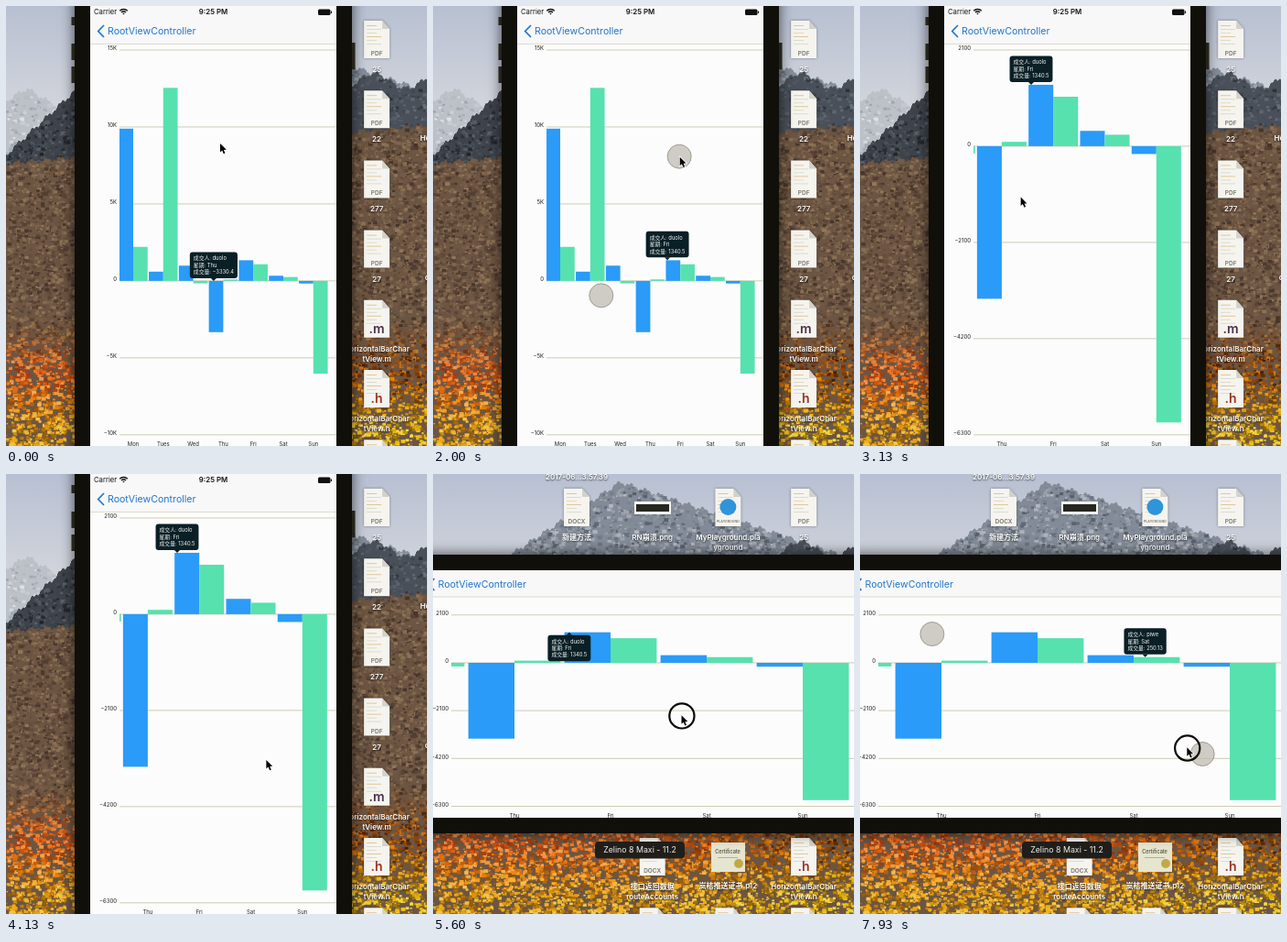
An HTML page with a canvas for the animation above (8 s loop, 460 by 480 pixels).

```html
<!DOCTYPE html>
<html>
<head>
<meta charset="utf-8">
<style>
html, body { margin: 0; width: 100%; height: 100%; overflow: hidden; background: #000; }
canvas { display: block; }
</style>
</head>
<body>
<canvas id="stage" width="460" height="480"></canvas>
<script>
const LOOP = 8000, W = 460, H = 480;
const FONT = 'Inter, "Noto Sans CJK SC", "Noto Sans CJK", sans-serif';
const BLUE = '#2a9bf8', GREEN = '#56e1af', TINT = '#2276cc', GRID = '#cdcdb4', INK = '#22221e';
const BUBBLE = '#0a1f26', BEZEL = '#100f09', PAPER = '#fcfcfd';
const CENTER = { x: 226.5, y: 240 };
const stage = document.getElementById('stage').getContext('2d');
let g = stage;

const DAYS = [
  ['Mon', 9890, 2210], ['Tues', 600, 12540], ['Wed', 990, -160], ['Thu', -3330.4, 95],
  ['Fri', 1340.5, 1080], ['Sat', 335, 250.13], ['Sun', -170, -6030]
];
// shift: touched point, in day widths from the middle of the day
const MARKERS = {
  thu: { day: 3, series: 1, shift: -.32, name: 'duolo' },
  fri: { day: 4, series: 1, shift: -.43, name: 'duolo' },
  sat: { day: 5, series: 2, shift: .12, name: 'piwe' }
};

const lerp = (a, b, p) => a + (b - a) * p;
const within = (t, ...spans) => spans.some(([a, b]) => t >= a && t < b);
function ease(from, to, t) {
  const p = Math.min(1, Math.max(0, (t - from) / (to - from)));
  return p * p * (3 - 2 * p);
}

function rect(color, x, y, w, h) {
  g.fillStyle = color;
  g.fillRect(x, y, w, h);
}
function roundRect(color, x, y, w, h, r) {
  g.fillStyle = color;
  g.beginPath();
  g.roundRect(x, y, w, h, r);
  g.fill();
}
function fillPath(color, d, x = 0, y = 0) {
  g.save();
  g.translate(x, y);
  g.fillStyle = color;
  g.fill(new Path2D(d));
  g.restore();
}
function circle(x, y, r, fill, stroke, width) {
  g.beginPath();
  g.arc(x, y, r, 0, 7);
  if (fill) { g.fillStyle = fill; g.fill(); }
  if (stroke) { g.strokeStyle = stroke; g.lineWidth = width; g.stroke(); }
}
function text(s, x, y, size, color, align = 'left', weight = 400) {
  g.font = `${weight} ${size}px ${FONT}`;
  g.fillStyle = color;
  g.textAlign = align;
  g.textBaseline = 'middle';
  g.fillText(s, x, y);
}
function clipped(x, y, w, h, paint) {
  g.save();
  g.beginPath();
  g.rect(x, y, w, h);
  g.clip();
  paint();
  g.restore();
}
function shadowed(color, blur, dy, paint) {
  g.save();
  g.shadowColor = color;
  g.shadowBlur = blur;
  g.shadowOffsetY = dy;
  paint();
  g.restore();
}

// ---- Desktop ----
let seed = 7;
function rnd() {
  seed = (seed * 16807) % 2147483647;
  return seed / 2147483647;
}
// Scatters small dabs below a skyline; colorAt gives the colour of each
function slope(count, x0, x1, bottom, skyline, colorAt) {
  const edge = x => skyline(x) + 2 * Math.sin(x * .4) + Math.sin(x * 1.3);
  for (let x = x0; x < x1; x++) rect(colorAt(x, edge(x), .5), x, edge(x), 1.5, bottom - edge(x));
  for (let i = 0; i < count; i++) {
    const x = lerp(x0, x1, rnd()), top = edge(x) + 1, y = lerp(top, bottom, rnd());
    const size = 1 + rnd() * 3;
    rect(colorAt(x, y, rnd()), x, y, size * 1.3, size);
  }
}
const rock = (light, contrast) => (x, y, r) => `hsl(215 9% ${light + (r - .5) * contrast}%)`;
function foliage(x, y, r) {
  const autumn = ease(330, 410, y), right = ease(190, 460, x), golden = ease(390, 470, y);
  const hue = lerp(27, 21, autumn) + 20 * golden + (r - .5) * 10 + 6 * right * autumn;
  const shade = 18 * right * (1 - ease(395, 470, y)) * autumn;
  const light = lerp(34, 48, autumn) - shade + (r - .5) * lerp(24, 34, autumn);
  return `hsl(${hue} ${lerp(24, 88, autumn)}% ${light}%)`;
}
function wallpaper() {
  const sky = g.createLinearGradient(0, 0, 0, 150);
  sky.addColorStop(0, '#b7c0d2');
  sky.addColorStop(1, '#dcdcdf');
  rect(sky, 0, 0, W, H);
  slope(300, 0, 75, 180, x => 90 + Math.abs(x - 22) * .6, rock(76, 24));
  slope(3500, 84, W, 160, x => 9 + (x < 204 ? (204 - x) * .66 : (x - 204) * .33), rock(55, 36));
  slope(300, 378, W, 170, x => 82 + 8 * Math.sin(x * .09), rock(32, 24));
  slope(500, 0, 75, 210, x => 162 - x * .93, rock(27, 26));
  slope(15000, 0, W, H, x => 172 - x * .09, foliage);
}
const column = i => 157 + 82.7 * i, row = i => 16 + 76.2 * i;
function page(x, y) {
  shadowed('#0006', 3, 0, () => fillPath('#f5f4ef', 'M-14 0H6L14 9V41H-14Z', x, y));
  fillPath('#d2d1ca', 'M6 0V9H14Z', x, y);
  for (let i = 0; i < 6; i++) rect(i % 3 ? '#dddccb' : '#e2c798', x - 11, y + 5 + i * 4, 11 + (i * 5) % 10, 1);
}
function label(x, y, ...lines) {
  shadowed('#000b', 2, 1, () =>
    lines.forEach((s, i) => text(s, x, y + i * 11, 8, '#fff', 'center', 600)));
}
function file(col, line, kind, size, color, ...names) {
  const x = column(col), y = row(line);
  page(x, y);
  text(kind, x, y + (size > 9 ? 32 : 36), size, color, 'center', 600);
  label(x, y + 53.5, ...names);
}
function desktop() {
  wallpaper();
  const gray = '#77756c';
  label(column(0), 4, '2017-06...3.57.39');
  file(0, 0, 'DOCX', 6.5, gray, '新建方法');
  rect('#f4f4ee', 220, 30, 40, 14);
  rect('#28271f', 222, 33, 36, 8);
  label(column(1), 70, 'RN崩溃.png');
  file(2, 0, 'PLAYGROUND', 3.6, gray, 'MyPlayground.pla', 'yground');
  circle(column(2), 36, 9, '#2f94d8');
  ['25', '22', '277', '27'].forEach((name, i) => file(3, i, 'PDF', 6.5, gray, name));
  file(3, 4, '.m', 14, '#4b3048', 'HorizontalBarChar', 'tView.m');
  file(3, 5, '.h', 14, '#9c3320', 'HorizontalBarChar', 'tView.h');
  file(1, 5, 'DOCX', 6.5, gray, '接口返回数据', 'routeAccounts');
  rect('#e6e5cf', 304, 402, 37, 32);
  text('Certificate', 322, 412, 5.5, '#4c4a38', 'center', 500);
  rect('#b5b08c', 311, 418, 22, 1);
  circle(334, 425, 5, '#c2a948');
  label(column(2), 450, '岚桔推送证书.p12');
  for (let i = 1; i < 4; i++) page(column(i), row(6));
  label(458, 145, 'Ho');
  label(460, 297, 'c');
}
const backdrop = document.createElement('canvas');
backdrop.width = W;
backdrop.height = H;
g = backdrop.getContext('2d');
desktop();
g = stage;

// ---- Chart ----
const signed = v => String(v).replace('-', '−');
const tickLabel = v => v && v % 5000 === 0 ? signed(v / 1000) + 'K' : signed(v);

// The value axis fits the bars that are in view
function valueRange({ left, right, pitch, monday }) {
  if (monday + pitch * 1.48 <= left) return { max: 2100, min: -6300, step: 2100 };
  const sundayShown = monday + pitch * 5.52 < right;
  return { max: 15000, min: sundayShown ? -10000 : -5000, step: 5000 };
}
function drawMarker({ day, series, shift, name }, view, yOf) {
  const value = DAYS[day][series];
  const x = view.monday + (day + shift) * view.pitch, y = yOf(Math.max(0, value));
  const lines = ['成交人: ' + name, '星期: ' + DAYS[day][0], '成交量: ' + signed(value)];
  g.font = `400 5.8px ${FONT}`;
  const w = Math.max(...lines.map(s => g.measureText(s).width)) + 8, h = 28.5;
  const below = y - 3 - h < view.top;
  const top = below ? y + 3 : y - 3 - h;
  roundRect(BUBBLE, x - w / 2, top, w, h, 3);
  fillPath(BUBBLE, below ? 'M-3 3H3L0 0Z' : 'M-3 -3H3L0 0Z', x, y);
  lines.forEach((s, i) => text(s, x - w / 2 + 4, top + 7.3 * (i + 1), 5.8, '#f2f5f2'));
}
function drawChart(view, marker) {
  const { left, right, top, bottom, pitch, monday } = view;
  const { max, min, step } = valueRange(view);
  const yOf = v => top + (max - v) / (max - min) * (bottom - top);
  for (let v = max; v >= min; v -= step) {
    rect(GRID, left, yOf(v) - .5, right - left, 1);
    text(tickLabel(v), left - 3, yOf(v) - 1.5, 6, INK, 'right');
  }
  const barWidth = pitch * .48;
  clipped(left, top, right - left, bottom - top, () =>
    DAYS.forEach(([, first, second], i) => {
      const x = monday + i * pitch;
      rect(BLUE, x - barWidth, yOf(0), barWidth, yOf(first) - yOf(0));
      rect(GREEN, x, yOf(0), barWidth, yOf(second) - yOf(0));
    }));
  DAYS.forEach(([name], i) => {
    const x = monday + i * pitch;
    if (x > left && x < right) text(name, x, bottom + 10.5, 6, INK, 'center');
  });
  drawMarker(marker, view, yOf);
}

// ---- Phone ----
function drawStatus(width) {
  text('Carrier', 4, 7, 7.7, '#111');
  text('9:25 PM', width / 2, 7, 7.8, '#111', 'center', 600);
  g.strokeStyle = '#111';
  g.lineWidth = 1.5;
  for (let r = 1; r < 7; r += 2.5) {
    g.beginPath();
    g.arc(36.5, 9.5, r, -Math.PI * .75, -Math.PI * .25);
    g.stroke();
  }
  roundRect('#111', width - 20, 3.5, 13.5, 6.5, 1.5);
  rect('#111', width - 6, 5.5, 1, 2.5);
}
function drawNavigation(width, turned) {
  const bottom = lerp(41.5, 29, turned), titleY = bottom - 14 + turned * .5;
  rect('#f8f8f9', 0, 0, width, bottom);
  rect('#dcdccb', 0, bottom - .5, width, 1);
  g.strokeStyle = TINT;
  g.lineWidth = 1.7;
  g.stroke(new Path2D(`M15 ${titleY - 6.5}l-6.3 6.5l6.3 6.5`));
  text('RootViewController', 19, titleY, 10.6, TINT);
  g.globalAlpha = 1 - turned;
  drawStatus(width);
  g.globalAlpha = 1;
}
function bezel(x, y, w, h) {
  shadowed('#000a', 14, 0, () => rect(BEZEL, x, y, w, h));
}
function drawPortrait(t, marker) {
  bezel(75, -20, 303, 520);
  rect('#25241a', 71.5, 12, 3.5, 9);
  for (const y of [41, 66]) rect('#25241a', 71.5, y, 3.5, 18);
  rect('#25241a', 378, 40, 3.5, 29);
  const zoom = ease(2080, 2690, t), pan = ease(2800, 3070, t);
  const view = {
    left: 124, right: 361, top: 48, bottom: 467.8,
    pitch: 32.8 + 23.5 * zoom, monday: 139 - 60 * zoom - 93 * pan
  };
  clipped(92, 0, 269, H, () => {
    rect(PAPER, 92, 0, 269, H);
    drawChart(view, marker);
    g.translate(92, 0);
    drawNavigation(269, 0);
  });
}
function drawLandscape(t, marker) {
  bezel(-20, 88, 500, 304);
  const turned = ease(4537, 4987, t);
  const w = lerp(270, 480, turned), h = lerp(480, 270, turned);
  const view = { left: 20, right: 467, top: 153.8, bottom: 362.5, pitch: 105, monday: -226 };
  clipped(0, 105, W, 270.5, () => {
    rect('#000', 0, 105, W, 270.5);
    g.translate(CENTER.x, CENTER.y);
    g.rotate((1 - turned) * Math.PI / 2);
    g.translate(-w / 2, -h / 2);
    clipped(0, 0, w, h, () => {
      rect(PAPER, 0, 0, w, h);
      g.translate(13.5, -105);
      drawChart(view, marker);
      g.translate(-13.5, 105);
      drawNavigation(w, turned);
    });
  });
  roundRect('#201e1b', 177, 401, 98, 18.5, 4);
  text('Zelino 8 Maxi - 11.2', 226, 410.5, 8.8, '#f1efe6', 'center');
}

// ---- Pointer ----
// Stops of the pointer: [time, x, y], eased from one to the next
const STOPS = [
  [0, 234, 150], [1000, 257, 152], [2100, 270, 165], [2530, 308, 90], [2800, 296, 206], [3070, 175, 208],
  [4600, 316, 342], [5550, 270, 263], [6000, 312, 268], [7700, 399, 316], [8060, 340, 291]
];
function pointerAt(t) {
  const i = Math.max(1, STOPS.findIndex(([time]) => time > t));
  const [t0, x0, y0] = STOPS[i - 1], [t1, x1, y1] = STOPS[i];
  const p = ease(t0, t1, t);
  return [lerp(x0, x1, p), lerp(y0, y1, p)];
}
function drawPointer(t) {
  if (within(t, [1980, 2740], [7400, LOOP])) {
    const [x, y] = pointerAt(t - 70);
    for (const side of [1, -1]) {
      circle(CENTER.x + side * (x - CENTER.x), CENTER.y + side * (y - CENTER.y), 13, '#b9b7aab0', '#8e8c80', .8);
    }
  }
  const [x, y] = pointerAt(t);
  if (within(t, [600, 720], [2100, 2700], [2790, 3080], [5500, 6050], [7760, LOOP])) {
    circle(x + .4, y + .7, 13.6, null, '#0b0b08', 2.2);
  }
  g.save();
  g.translate(x, y);
  const arrow = new Path2D('M0 0V9.5L2.2 7.5L3.8 11.2L5.4 10.5L3.9 7L6.8 6.8Z');
  g.strokeStyle = '#fff';
  g.lineWidth = 1.4;
  g.stroke(arrow);
  g.fillStyle = '#000';
  g.fill(arrow);
  g.restore();
}

function frame() {
  const t = performance.now() % LOOP;
  const marker = t < 680 ? MARKERS.thu : t < 5900 ? MARKERS.fri : MARKERS.sat;
  g.drawImage(backdrop, 0, 0);
  (t < 4400 ? drawPortrait : drawLandscape)(t, marker);
  drawPointer(t);
  requestAnimationFrame(frame);
}
frame();
</script>
</body>
</html>
```
